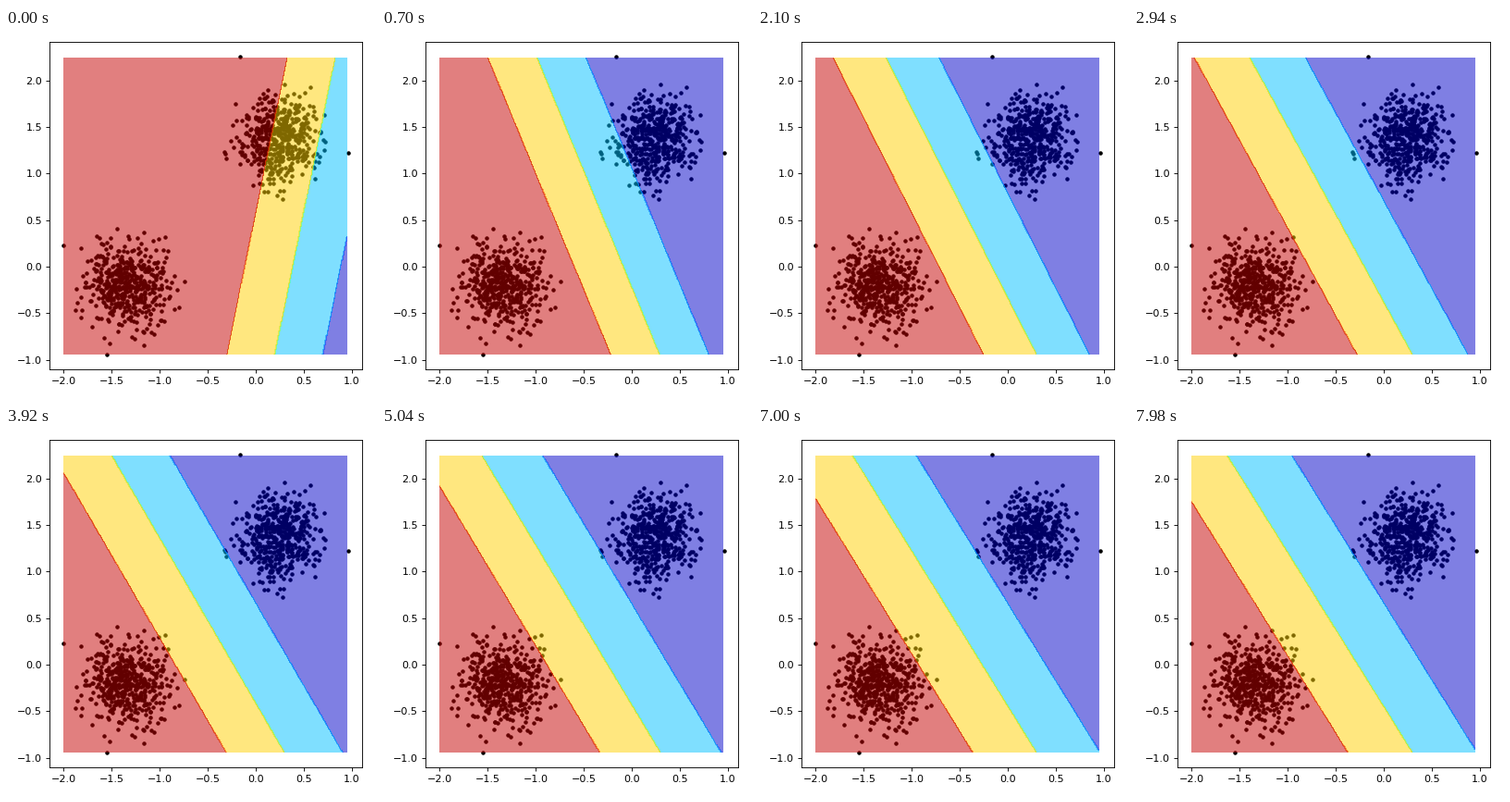
These frames come from a looping animation (400x400 px, 8 s). A matplotlib script:

```python
import numpy as np
import matplotlib.pyplot as plt
from matplotlib.animation import FuncAnimation

SIZE, DPI = 400, 80
TICK, STEP, LOOP = 20, 140, 8000  # ms
X0, X1, Y0, Y1 = -2.0, 0.96, -0.943, 2.2565
LEVELS = np.linspace(0, 3.2, 9) - 1e-6


def cluster(rng, center, std, total=500, reach=2.9):
    unit = rng.normal(size=(2 * total, 2))
    unit = unit[np.hypot(*unit.T) < reach][:total]
    return center + unit * std


def boundary(step):
    """Top and bottom x of the middle line, and the band width."""
    top = -1.655 + np.exp(-step / 15) + 1.485 * np.exp(-step / 4.5) * np.cos(0.335 * step)
    bottom = 0.3 - 0.1 * np.exp(-step / 2)
    band = 0.5 + 0.19 * (1 - np.exp(-(step / 32) ** 1.5))
    return top, bottom, band


fig = plt.figure(figsize=(SIZE / DPI, SIZE / DPI), dpi=DPI, facecolor="white")
ax = fig.add_axes([47 / SIZE, 31 / SIZE, 338 / SIZE, 354 / SIZE])
mx, my = 0.05 * (X1 - X0), 0.05 * (Y1 - Y0)
ax.set(xlim=(X0 - mx, X1 + mx), ylim=(Y0 - my, Y1 + my),
       xticks=np.arange(-2, 1.1, 0.5), yticks=np.arange(-1, 2.1, 0.5))
ax.set_autoscale_on(False)

# Two blobs, plus the extreme samples that set the plotted range
rng = np.random.default_rng(4)
dots = np.vstack([
    cluster(rng, (-1.34, -0.2), (0.215, 0.235)),
    cluster(rng, (0.24, 1.38), (0.215, 0.225)),
    [(X0, 0.23), (-1.555, Y0), (-0.16, Y1), (X1, 1.22)],
])
ax.scatter(*dots.T, c="black", marker=".", s=36, zorder=1)

gx, gy = np.meshgrid(np.arange(X0, X1, 0.01), np.arange(Y0, Y1, 0.01))
rise = (gy - Y0) / (Y1 - Y0)
shown = {"step": None, "fill": None}


def draw_regions(step):
    top, bottom, band = boundary(step)
    side = gx - (bottom + (top - bottom) * rise)
    label = sum((side < k * band).astype(float) for k in (-1, 0, 1))
    return ax.contourf(gx, gy, label, levels=LEVELS, cmap="jet", alpha=0.5)


def update(i):
    step = i * TICK // STEP
    if step != shown["step"]:
        if shown["fill"] is not None:
            shown["fill"].remove()
        shown.update(step=step, fill=draw_regions(step))
    return []


anim = FuncAnimation(fig, update, frames=LOOP // TICK, interval=TICK,
                     init_func=lambda: update(0), repeat=True, repeat_delay=0)
plt.show()
```
